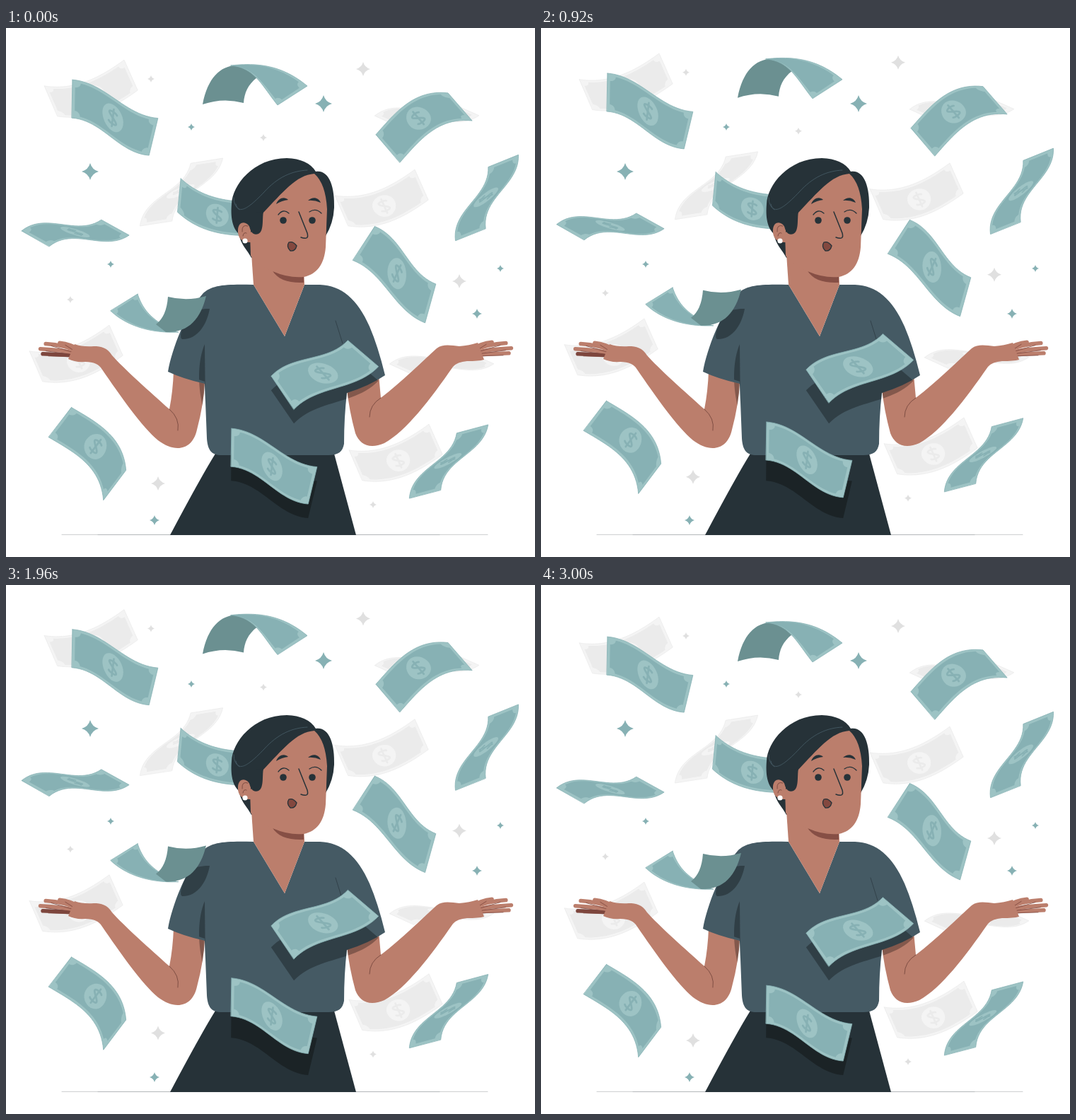
These frames come from a looping animation (748 by 748 pixels, 3.04 s). An HTML page with a canvas:

```html
<!DOCTYPE html>
<html lang="en">
<head>
<meta charset="utf-8">
<title>Falling money</title>
<style>
html, body { margin: 0; width: 100%; height: 100%; overflow: hidden; background: #fff; }
canvas { display: block; width: 100vw; height: 100vh; }
</style>
</head>
<body>
<canvas id="stage"></canvas>
<script>
const SIZE = 748, LOOP = 3040, HALF = 1500, RISE = 15;
const canvas = document.getElementById('stage');
const ctx = canvas.getContext('2d');
const ratio = window.devicePixelRatio || 1;
canvas.width = canvas.height = SIZE * ratio;

const DARK = '#263238', SHIRT = '#455a64', SKIN = '#bb7e6c', CREASE = '#7d463d';
const SHADE = 'rgba(0,0,0,.3)', BACK = '#6b9091';
const TEAL = { base: '#87b1b4', light: '#9dc3c4' };
const GRAY = { base: '#ebebeb', light: '#f4f4f4' };

function fill(d, color) {
  ctx.fillStyle = color;
  ctx.fill(new Path2D(d));
}

function line(d, color, width) {
  ctx.strokeStyle = color;
  ctx.lineWidth = width;
  ctx.stroke(new Path2D(d));
}

function dot(x, y, r, color) {
  ctx.fillStyle = color;
  ctx.beginPath();
  ctx.arc(x, y, r, 0, 7);
  ctx.fill();
}

function clipped(shapes, draw) {
  const area = new Path2D();
  shapes.forEach(d => area.addPath(new Path2D(d)));
  ctx.save();
  ctx.clip(area);
  draw();
  ctx.restore();
}

function moved(dx, dy, draw) {
  ctx.save();
  ctx.translate(dx, dy);
  draw();
  ctx.restore();
}

function star(x, y, r, color) {
  ctx.fillStyle = color;
  ctx.beginPath();
  ctx.moveTo(x, y - r);
  for (let i = 0; i < 4; i++) {
    const a = i * Math.PI / 2, b = a - Math.PI / 4;
    ctx.quadraticCurveTo(x + r * .31 * Math.cos(b), y + r * .31 * Math.sin(b), x + r * Math.cos(a), y + r * Math.sin(a));
  }
  ctx.fill();
}

// Length of a note and how far its long edges bow at one and two thirds.
const KINDS = {
  wave: [127, -16, 16],
  leaf: [114, -23, 19],
  sail: [119, 20, 13],
  hump: [118, -13, -29]
};

const polar = (r, deg) => [r * Math.cos(deg * Math.PI / 180), r * Math.sin(deg * Math.PI / 180)];
const mix = (a, b, t) => a.map((n, i) => n + (b[i] - n) * t);

function edge(a, b, near, far) {
  const dx = b[0] - a[0], dy = b[1] - a[1], len = Math.hypot(dx, dy);
  const bow = (t, k) => [a[0] + dx * t - dy / len * k, a[1] + dy * t + dx / len * k];
  return [a, bow(1 / 3, near), bow(2 / 3, far), b];
}

// A note is a strip between two bowed edges, addressed by (u, v) in 0..1.
function note(kind, x, y, angle, width, lean, twist = 0) {
  const [len, near, far] = KINDS[kind];
  const [ux, uy] = polar(len / 2, angle);
  const [ax, ay] = polar(width / 2, lean - twist / 2);
  const [bx, by] = polar(width / 2, lean + twist / 2);
  return {
    thin: kind === 'leaf',
    top: edge([x - ux - ax, y - uy - ay], [x + ux - bx, y + uy - by], near, far),
    bottom: edge([x - ux + ax, y - uy + ay], [x + ux + bx, y + uy + by], near, far)
  };
}

function along(p, t) {
  while (p.length > 1) p = p.slice(1).map((q, i) => mix(p[i], q, t));
  return p[0];
}

function trace(n, points) {
  ctx.beginPath();
  points.forEach(([u, v]) => ctx.lineTo(...mix(along(n.top, u), along(n.bottom, u), v)));
}

const steps = (count, f) => Array.from({ length: count + 1 }, (_, i) => f(i / count));
const halfTurn = p => [1 - p[0], 1 - p[1]];

function framed(side) {
  return [...side, ...side.map(halfTurn)];
}

function notch(u, v, from) {
  return steps(6, t => {
    const a = from - t * Math.PI / 2;
    return [u + .06 * Math.cos(a), v + .13 * Math.sin(a)];
  });
}

const medal = (x, y) => [.5 + x * .138, .5 + y * .33];
const RIM = framed(steps(24, t => [t, 0]));
const PANEL = framed([
  ...notch(.03, .065, Math.PI / 2),
  ...steps(20, t => [.09 + .82 * t, .065]),
  ...notch(.97, .065, Math.PI)
]);
const RING = steps(32, t => medal(Math.cos(t * 2 * Math.PI), Math.sin(t * 2 * Math.PI)));
const ESS = steps(30, t => {
  const a = -.6 + t * (Math.PI + 1.2);
  return medal(-.38 * Math.sin(2 * a), -.46 * Math.cos(a));
});
const BAR = [medal(0, -.68), medal(0, .68)];

function drawNote(n, tint) {
  trace(n, RIM);
  ctx.closePath();
  ctx.fillStyle = tint.light;
  ctx.fill();
  ctx.strokeStyle = tint.base;
  ctx.lineWidth = .8;
  ctx.stroke();
  trace(n, PANEL);
  ctx.fillStyle = tint.base;
  ctx.fill();
  if (n.plain) return;
  trace(n, RING);
  ctx.fillStyle = tint.light;
  ctx.fill();
  ctx.lineWidth = n.thin ? 1.5 : 2.7;
  for (const part of [ESS, BAR]) {
    trace(n, part);
    ctx.stroke();
  }
}

function castShadow(n, color) {
  moved(0, 20, () => {
    trace(n, RIM);
    ctx.fillStyle = color;
    ctx.fill();
  });
}

const sail = (x, y) => note('sail', x, y, -18, 47, 66);
const leaf = (x, y) => note('leaf', x, y, -8, 38, 24);
const wave = (x, y) => note('wave', x, y, 25, 54, 97, 13);

const grayNotes = [
  sail(551, 600), sail(531, 240), sail(99, 460), sail(120, 85),
  leaf(595, 124), leaf(616, 475), note('leaf', 248, 232, -51, 46, -9)
];
const backNotes = [
  wave(151, 127),
  note('hump', 591, 141, -30, 52, 49),
  note('hump', 115, 602, 49, 53, 127),
  note('leaf', 680, 240, -66, 46, -22),
  note('leaf', 626, 613, -54, 46, -15),
  note('leaf', 98, 290, -8, 45, 29),
  note('sail', 302, 253, 16, 48, 95),
  note('wave', 553, 347, 42, 57, 114, -17)
];
const skirtNote = wave(376, 620);
const shirtNote = note('wave', 448, 488, -26, 57, 48, -15);

// Rolled notes: one visible half and a dark underside.
const archFront = {
  plain: true,
  top: [[318, 53], [355, 49], [390, 52], [426, 82]],
  bottom: [[318, 53], [352, 56], [362, 82], [384, 109]]
};
const curlFront = {
  plain: true,
  top: [[186, 376], [194, 400], [208, 415], [242, 430]],
  bottom: [[148, 400], [170, 421], [205, 432], [244, 430]]
};

function arch() {
  fill('M278 108C285 70 304 52 328 53Q346 56 355 70C342 80 337 92 336 106Q307 98 278 108Z', BACK);
  drawNote(archFront, TEAL);
}

function curl() {
  drawNote(curlFront, TEAL);
  fill('M229 380Q256 387 283 379C275 412 258 431 226 430L212 419Q227 408 229 380Z', BACK);
}

const tealStars = [[449, 107, 12], [119, 203, 12], [262, 140, 5], [148, 334, 5], [666, 404, 7], [699, 340, 5], [210, 696, 7]];
const grayStars = [[505, 58, 10], [205, 72, 5], [364, 155, 5], [641, 358, 10], [91, 384, 5], [215, 644, 10], [519, 674, 5]];

const leftArm = 'M237 485Q236 514 231 539C204 515 166 481 150 463C143 452 135 450 124 450Q108 451 97 447L88 468' +
  'Q98 473 112 472Q130 472 136 483C160 518 193 565 215 583C240 602 264 596 270 568Q280 530 281 500Z';
const rightArm = 'M527 490L530 523C560 500 588 472 609 453C618 446 630 449 641 450Q655 449 667 445L676 469' +
  'Q668 471 652 471Q638 472 632 479C600 525 566 570 535 587C514 596 500 589 494 573Q485 540 482 510Z';
const shirt = 'M350 363L394 436L422 363L444 363C474 364 497 383 514 422Q526 450 536 491Q514 506 482 516' +
  'Q478 550 478 588C476 599 470 604 456 604L302 604C290 603 285 596 284 580L281 503' +
  'Q250 496 229 486C235 452 255 402 278 376C290 363 312 362 350 363Z';
const skirt = 'M296 602Q276 634 232 717L495 717Q481 665 464 602Z';

// Four fingers fan out from the knuckles; side is 1 for left, -1 for right.
function hand(x, y, side, last) {
  [58, 62, 56, 38].forEach((len, i) => {
    const a = .02 + i * .1 + i * i * .015;
    const tx = x - side * len * Math.cos(a), ty = y - len * Math.sin(a);
    const root = `M${x} ${y + 2 - i * 2}`;
    line(`${root}Q${x - side * len * .5} ${ty + 1} ${tx} ${ty}`, i ? SKIN : last, 5.5);
    line(`M${tx + side * 8} ${ty + 3}L${x - side * 14} ${y + 3 - i * 3}`, CREASE, .8);
  });
}

function body() {
  fill(skirt, DARK);
  hand(110, 462, 1, CREASE);
  hand(653, 461, -1, SKIN);
  fill(leftArm, SKIN);
  fill(rightArm, SKIN);
  line('M231 539Q246 552 243 569M530 523Q514 533 514 550', '#6f4239', .8);
  fill(shirt, SHIRT);
  clipped([leftArm, shirt], () => fill('M281 447C271 470 270 508 280 542L282 542Z', SHADE));
  line('M466 414L476 446', DARK, .6);
  clipped([shirt, rightArm], () => {
    castShadow(shirtNote, SHADE);
    fill('M282 397L288 397C284 420 270 441 249 440C243 437 252 415 262 400Z', SHADE);
  });
  clipped([skirt], () => castShadow(skirtNote, '#1b2326'));
}

function head() {
  fill('M347 325C340 312 333 308 329 291C318 280 318 262 319 249C320 222 350 184 397 184Q427 185 438 203' +
    'C457 200 465 225 464 254Q463 276 452 294L400 310Z', DARK);
  fill('M345 290L350 363L394 436L422 363L421 340Z', SKIN);
  fill('M376 342C384 356 400 361 421 360L421 348Z', '#864f45');
  fill('M346 285C343 273 329 271 328 285C327 298 335 304 346 303Z', SKIN);
  line('M342 280Q333 277 334 288M340 290Q336 288 335 294', '#6f4239', .8);
  fill('M436 206C410 208 392 232 363 262L345 291L346 322Q357 337 377 344Q400 354 421 352' +
    'C440 348 450 334 452 310L454 256Q452 220 436 206Z', SKIN);
  fill('M344 262L364 260C362 270 365 287 357 291C350 294 344 288 344 276Z', DARK);
  line('M325 249C329 266 346 252 365 232C384 211 404 202 426 201M322 240Q322 252 330 257', SHIRT, .9);
  dot(338, 301, 3.6, '#fff');
  dot(392, 272, 4.8, DARK);
  dot(433, 272, 4.8, DARK);
  fill('M382 249C385 240 394 238 399 243Q390 244 382 249ZM427 244C433 238 442 239 445 247Q436 243 427 244Z', DARK);
  line('M385 264Q392 255 400 262M429 260Q438 254 446 262', DARK, 1.3);
  line('M414 260L426 290C428 297 425 299 417 296', DARK, 1.5);
  const mouth = 'M400 303Q406 301 411 308Q409 316 402 315Q396 309 400 303Z';
  fill(mouth, '#83483f');
  line(mouth, DARK, 1.3);
}

function render(time) {
  const t = time % LOOP;
  const rise = RISE * Math.max(0, 1 - Math.abs(t - HALF) / HALF);
  ctx.setTransform(ratio, 0, 0, ratio, 0, 0);
  ctx.lineCap = ctx.lineJoin = 'round';
  ctx.fillStyle = '#fff';
  ctx.fillRect(0, 0, SIZE, SIZE);
  line('M79 716.4H681', '#a8acae', .6);
  line('M130 716.6H613', '#a8acae', .6);
  tealStars.forEach(s => star(...s, TEAL.base));
  moved(0, -rise, () => {
    grayStars.forEach(s => star(...s, '#e0e0e0'));
    grayNotes.forEach(n => drawNote(n, GRAY));
    backNotes.forEach(n => drawNote(n, TEAL));
    arch();
  });
  body();
  head();
  moved(0, -rise, () => {
    drawNote(skirtNote, TEAL);
    drawNote(shirtNote, TEAL);
    curl();
  });
}

let start;
function tick(now) {
  if (start === undefined) start = now;
  render(now - start);
  requestAnimationFrame(tick);
}
render(0);
requestAnimationFrame(tick);
</script>
</body>
</html>
```
